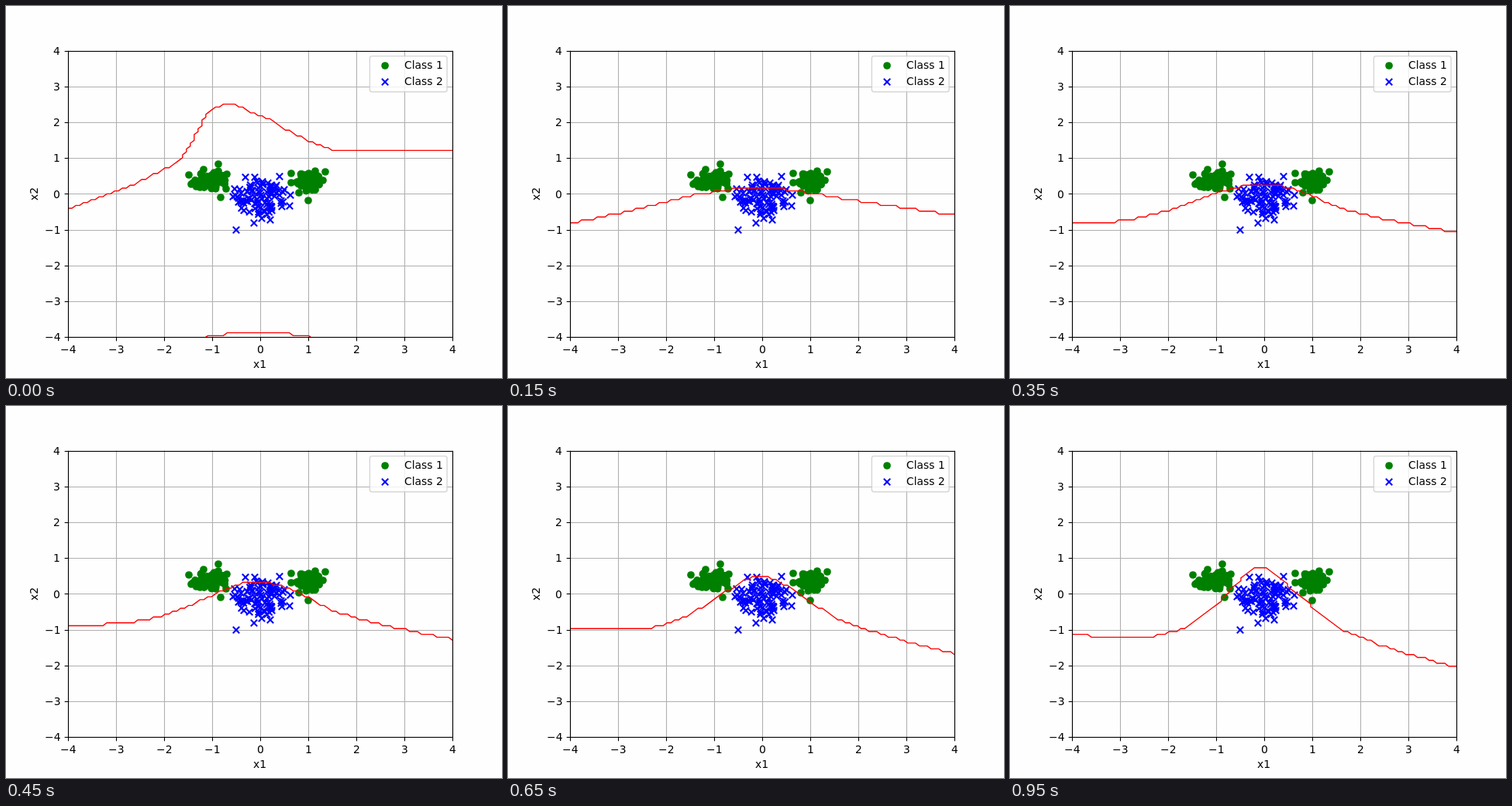
These frames come from a looping animation (640x480 px, 1500 ms). An HTML page with a canvas:

```html
<!DOCTYPE html>
<html lang="en">
<head>
<meta charset="utf-8">
<title>Decision boundary</title>
<style>
html, body { margin: 0; width: 100%; height: 100%; overflow: hidden; background: #fefefe; }
canvas { display: block; }
</style>
</head>
<body>
<canvas id="plot" width="640" height="480"></canvas>
<script>
const ctx = document.getElementById('plot').getContext('2d');

// Axes: -4..4 both ways; the boundary is sampled on a 100 x 100 grid.
const L = 80, R = 576, T = 57.6, B = 427.2;
const COLS = 99, DX = (R - L) / COLS, DY = (B - T) / COLS;
const PT = 100 / 72;
const STEP = 50, LAST = 19, LOOP = 1500;
const px = v => 328 + 62 * v;
const py = v => 242.4 - 46.2 * v;
const snap = v => Math.floor(v + 0.5) + 0.5;

// Boundary poses: heights in grid rows above zero at a few columns.
const knots = [0, 12, 22, 30, 36, 49.5, 58, 68, 78, 88, 99];
const poses = [
  { step: 0, h: [-5.2, 0.8, 6.6, 14, 27.5, 27, 21, 15.3, 15, 15, 15.3] },
  { step: 3, h: [-10.2, -6.9, -3.7, -1, 0.4, 2.3, 1.1, -1.1, -3.2, -5.2, -7.3] },
  { step: 7, h: [-10, -9.4, -6.7, -3.3, -0.2, 3.3, 1.2, -4.3, -7.9, -10.6, -13.3] },
  { step: 13, h: [-12, -12, -11.3, -7.8, -3, 6.2, 1, -8, -13, -17, -20.7] },
  { step: 19, h: [-14, -15, -14.3, -11, -5, 9, 0, -11, -17, -21.3, -25.3] }
];

const chord = (h, i) => (h[i + 1] - h[i]) / (knots[i + 1] - knots[i]);

function slope(h, i) {
  const n = knots.length - 1;
  if (i === 0) return chord(h, 0);
  if (i === n) return chord(h, n - 1);
  const a = knots[i] - knots[i - 1], b = knots[i + 1] - knots[i];
  return (chord(h, i - 1) * b + chord(h, i) * a) / (a + b);
}

// Cubic Hermite curve through the knots.
function curve(h, c) {
  let i = 0;
  while (i < knots.length - 2 && knots[i + 1] < c) i++;
  const w = knots[i + 1] - knots[i], u = (c - knots[i]) / w, v = 1 - u;
  return h[i] * v * v * (1 + 2 * u) + h[i + 1] * u * u * (3 - 2 * u)
    + w * u * v * (slope(h, i) * v - slope(h, i + 1) * u);
}

function poseAt(step) {
  let k = 0;
  while (k < poses.length - 2 && poses[k + 1].step <= step) k++;
  const a = poses[k], b = poses[k + 1];
  let u = (step - a.step) / (b.step - a.step);
  if (k === 0) u = 1 - (1 - u) ** 3;
  return a.h.map((v, i) => v + (b.h[i] - v) * u);
}

let seed = 7;
function rand() {
  seed = (seed * 16807) % 2147483647;
  return seed / 2147483647;
}

// An evenly filled, slightly jittered ellipse of points.
function blob(n, cx, cy, rx, ry) {
  return Array.from({ length: n }, (_, i) => {
    const r = Math.sqrt((i + 0.5) / n), a = i * 2.4 + rand();
    return [cx + rx * r * Math.cos(a), cy + ry * r * Math.sin(a)];
  });
}

const dots = [
  ...blob(45, 262, 226, 22, 12),
  [236, 218], [239, 230], [255, 211], [274, 204], [274, 213], [285, 217], [284, 236], [277, 247],
  ...blob(40, 390, 227, 16, 13),
  [368, 216], [368, 228], [378, 241], [390, 251], [399, 213], [409, 225], [412, 214]
];
const crosses = [
  ...blob(80, 328, 248, 33, 22),
  [297, 289], [309, 221], [321, 221], [353, 220], [323, 226], [331, 230], [295, 236],
  [293, 246], [359, 237], [367, 244], [366, 258], [320, 280], [330, 274], [341, 276]
];

function line(pts) {
  ctx.beginPath();
  pts.forEach(([x, y]) => ctx.lineTo(x, y));
  ctx.stroke();
}

function dot([x, y]) {
  ctx.fillStyle = '#008000';
  ctx.beginPath();
  ctx.arc(x, y, 3.5 * PT, 0, 2 * Math.PI);
  ctx.fill();
}

function cross([x, y]) {
  const r = 3 * PT;
  ctx.strokeStyle = '#00f';
  ctx.lineWidth = 1.5 * PT;
  line([[x - r, y - r], [x + r, y + r]]);
  line([[x - r, y + r], [x + r, y - r]]);
}

// Text starts on whole pixels, as in a rasterised chart.
function text(s, x, y, align = 0) {
  ctx.fillStyle = '#000';
  ctx.fillText(s, Math.round(x - align * ctx.measureText(s).width), Math.round(y));
}

function grid() {
  ctx.strokeStyle = '#b0b0b0';
  ctx.lineWidth = 0.8 * PT;
  for (let v = -4; v <= 4; v++) {
    line([[snap(px(v)), T], [snap(px(v)), B]]);
    line([[L, snap(py(v))], [R, snap(py(v))]]);
  }
}

// Stair-stepped outline between grid nodes; big jumps get an upright piece.
function trace(height) {
  const x = c => L + c * DX, y = m => 242.4 - m * DY;
  const pts = [];
  let last;
  for (let c = 0; c <= COLS; c++) {
    const m = Math.round(height(c));
    if (c && Math.abs(m - last) > 1) {
      const d = Math.sign(m - last) / 2;
      pts.push([x(c - 0.5), y(last + d)], [x(c - 0.5), y(m - d)]);
    }
    pts.push([x(c), y(m)]);
    last = m;
  }
  line(pts);
}

function contour(step) {
  const h = poseAt(step);
  ctx.save();
  ctx.beginPath();
  ctx.rect(L, T, R - L, B - T);
  ctx.clip();
  ctx.strokeStyle = '#f00';
  ctx.lineWidth = PT;
  trace(c => curve(h, c));
  if (step === 0) trace(c => -47.8 - 0.0095 * (c - 48.8) ** 2);
  ctx.restore();
}

function axes() {
  const l = snap(L), r = snap(R), t = snap(T), b = snap(B);
  ctx.strokeStyle = '#000';
  ctx.lineWidth = 0.8 * PT;
  ctx.strokeRect(l, t, r - l, b - t);
  for (let v = -4; v <= 4; v++) {
    const x = snap(px(v)), y = snap(py(v));
    const s = v < 0 ? '\u2212' + -v : String(v);
    line([[x, b], [x, b + 4.86]]);
    line([[l, y], [l - 4.86, y]]);
    text(s, px(v), 448, 0.5);
    text(s, 70.3, py(v) + 5.2, 1);
  }
  text('x1', 328, 467, 0.5);
  ctx.save();
  ctx.translate(41, 242);
  ctx.rotate(-Math.PI / 2);
  text('x2', 0, 0, 0.5);
  ctx.restore();
}

function legend() {
  ctx.beginPath();
  ctx.roundRect(469.4, 64.6, 99.7, 46.2, 2.78);
  ctx.fillStyle = 'rgba(255,255,255,.8)';
  ctx.strokeStyle = 'rgba(204,204,204,.8)';
  ctx.lineWidth = PT;
  ctx.fill();
  ctx.stroke();
  dot([489.1, 77]);
  cross([489.1, 98]);
  text('Class 1', 514, 81);
  text('Class 2', 514, 102);
}

function draw(step) {
  ctx.fillStyle = '#fefefe';
  ctx.fillRect(0, 0, 640, 480);
  ctx.font = 10 * PT + 'px "DejaVu Sans", sans-serif';
  grid();
  dots.forEach(dot);
  crosses.forEach(cross);
  contour(step);
  axes();
  legend();
}

let shown = -1;
const t0 = performance.now();
function tick() {
  const t = (performance.now() - t0) % LOOP;
  const step = Math.min(LAST, Math.floor(t / STEP));
  if (step !== shown) draw(shown = step);
  requestAnimationFrame(tick);
}
tick();
</script>
</body>
</html>
```
